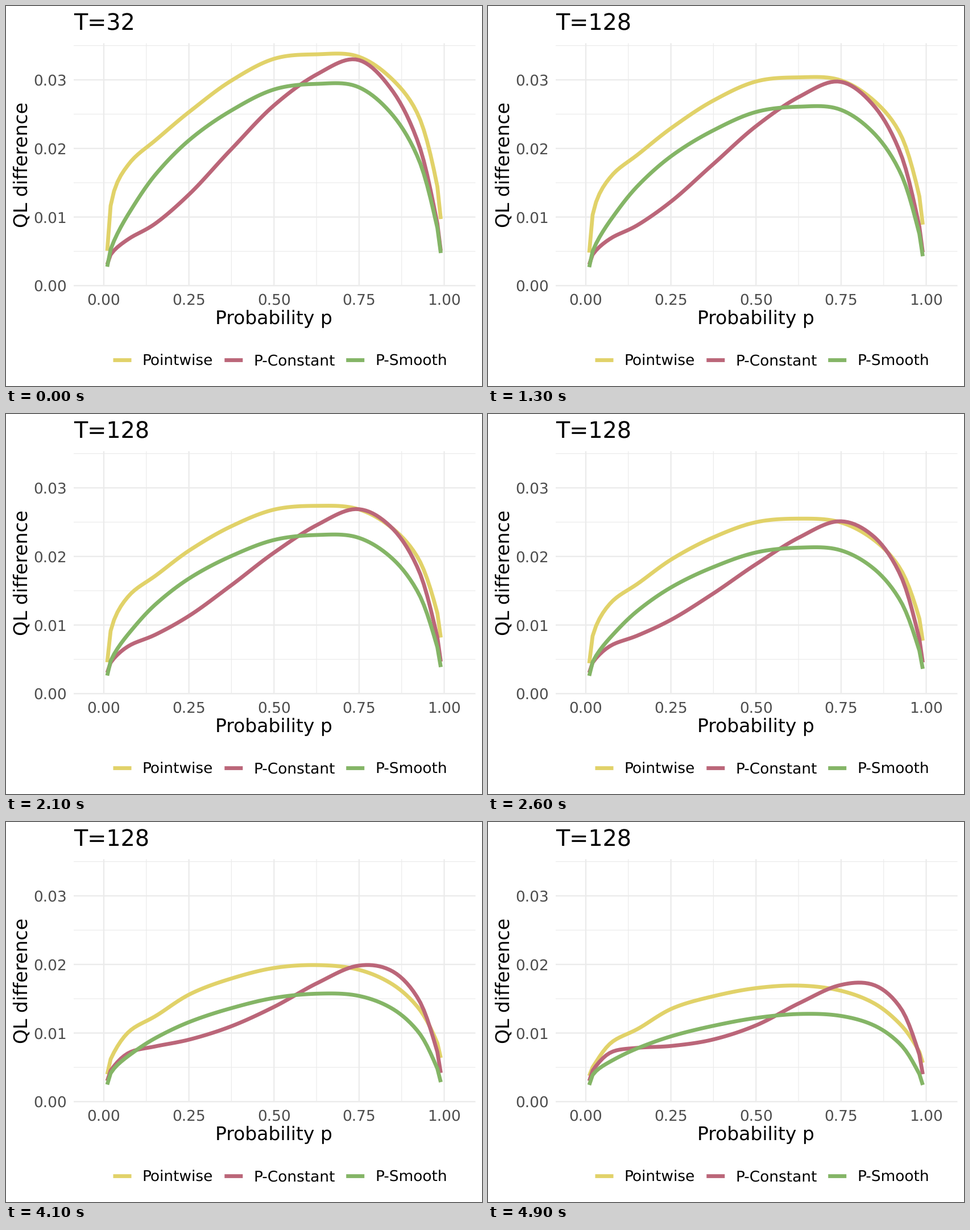
Animation of 837 by 669 pixels, one loop 8 s. Source, as a matplotlib script:

```python
import matplotlib.pyplot as plt
import numpy as np
from matplotlib.animation import FuncAnimation

W, H, DPI = 837, 669, 64
PT = 72 / DPI                      # points per pixel
FRAMES, INTERVAL = 80, 100
HOLD, STEPS = 5, 45                # still frames, then steps of the morph

LEFT, RIGHT, TOP, BASE = 119, 825.5, 65.5, 492.3
EM = 33                            # base text size in pixels
BIG, SMALL = 1.2 * EM, 0.8 * EM
STROKE = 6.8
YELLOW, RED, GREEN = "#E1D269", "#BB6679", "#84B566"
GRID, GREY = "#EBEBEB", "#4D4D4D"

plt.rcParams["font.family"] = "DejaVu Sans"
plt.rcParams["text.hinting"] = "none"

P = np.linspace(.01, .99, 99)

# Name, colour, legend x, then key values (in 1e-5) at the start and the end.
SERIES = [
    ("Pointwise", YELLOW, 188.5,
     [508, 1319, 1787, 2127, 2549, 2984, 3307, 3373, 3344, 3013, 2479, 1609, 971],
     [375, 553, 864, 1063, 1361, 1535, 1655, 1692, 1622, 1435, 1125, 785, 566]),
    ("P-Constant", RED, 384.3,
     [309, 495, 690, 913, 1352, 1982, 2628, 3083, 3294, 2851, 2073, 1071, 508],
     [301, 499, 723, 785, 814, 905, 1112, 1435, 1696, 1700, 1369, 789, 400]),
    ("P-Smooth", GREEN, 598.2,
     [276, 615, 1071, 1630, 2139, 2549, 2860, 2942, 2901, 2499, 1849, 988, 475],
     [243, 429, 595, 781, 959, 1104, 1220, 1278, 1253, 1112, 835, 466, 243]),
]


def px(p):
    return 172 + 598.5 * p


def py(value):
    return BASE - 12075 * value


def spline(keys):
    """Curve at P through keys spaced by cosine, so they crowd at both ends."""
    y = np.array(keys) * 1e-5
    m = np.gradient(y, edge_order=2)
    last = len(y) - 1
    s = np.arccos(np.clip((.5 - P) / .49, -1, 1)) / np.pi * last
    i = np.minimum(s.astype(int), last - 1)
    t = s - i
    ease = t * t * (3 - 2 * t)
    return (y[i] + (y[i + 1] - y[i]) * ease
            + t * (1 - t) * ((1 - t) * m[i] - t * m[i + 1]))


fig = plt.figure(figsize=(W / DPI, H / DPI), dpi=DPI, facecolor="white")
ax = fig.add_axes([0, 0, 1, 1])
ax.set(xlim=(0, W), ylim=(H, 0))
ax.axis("off")


def line(x, y, color, width):
    return ax.plot(x, y, color=color, lw=width * PT, solid_capstyle="butt",
                   solid_joinstyle="round", snap=False)[0]


def label(x, y, text, size, color="black", **kw):
    return ax.text(x, y, text, fontsize=size * PT, color=color, ha="left",
                   va="baseline", **kw)


def grid(x_marks, y_marks, width):
    for v in y_marks:
        line([LEFT, RIGHT], [py(v)] * 2, GRID, width)
    for p in x_marks:
        line([px(p)] * 2, [TOP, BASE], GRID, width)


x_ticks = np.arange(5) / 4
y_ticks = np.arange(4) / 100
grid(x_ticks[:-1] + .125, y_ticks + .005, 1.2)
grid(x_ticks, y_ticks, 2.3)
for p in x_ticks:
    label(px(p) - 29.4, 525.2, f"{p:.2f}", SMALL, GREY)
for v in y_ticks:
    label(48, py(v) + 9.6, f"{v:.2f}", SMALL, GREY)

title = label(119, 42.3, "T=32", BIG)
label(368.4, 559, "Probability p", EM)
label(37.3, 389.8, "QL difference", EM, rotation=90, rotation_mode="anchor")

curves = []
for name, color, x, start, end in SERIES:
    line([x, x + 32], [623.5] * 2, color, STROKE)
    label(x + 51, 633, name, SMALL)
    a, b = spline(start), spline(end)
    curves.append((line(px(P), py(a), color, STROKE), a, b))


def update(frame):
    t = np.clip((frame - HOLD + 1) / STEPS, 0, 1)
    title.set_text("T=128" if t > 0 else "T=32")
    for curve, a, b in curves:
        curve.set_ydata(py(a + (b - a) * t))
    return [title] + [c[0] for c in curves]


anim = FuncAnimation(fig, update, frames=FRAMES, interval=INTERVAL, repeat=True)
plt.show()
```
